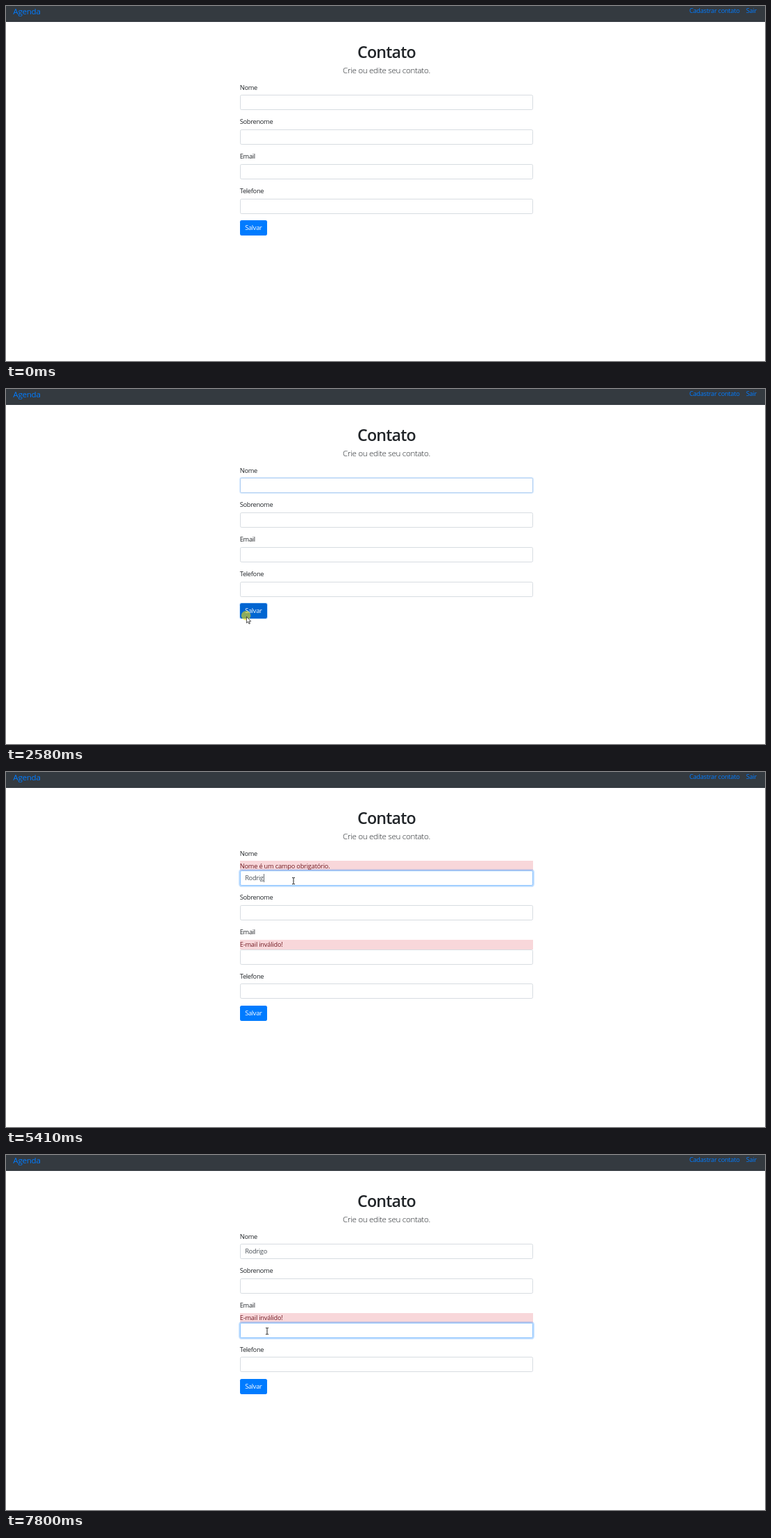
Recreate the animation shown at these times as an HTML page. Size 1093x512 px, loop 8000 ms.

```html
<!DOCTYPE html>
<html lang="pt-BR">
<head>
<meta charset="utf-8">
<title>Agenda</title>
<style>
* { box-sizing: border-box; margin: 0; }
html { font-size: 9.26px; }
html, body { width: 100%; height: 100%; overflow: hidden; background: #fff; }
body {
  position: relative; color: #212529; white-space: nowrap;
  font: 1rem/1.5 "Open Sans", "Noto Sans", sans-serif; letter-spacing: -.03em;
}
nav { position: absolute; inset: 0 0 auto; height: 23px; background: #343a40; color: #007bff; }
nav span { position: absolute; top: .3px; }
nav .brand { left: 10.3px; top: -1.4px; font-size: 1.25rem; letter-spacing: -.02em; }
main { position: absolute; left: 336.7px; top: 51.4px; width: 422.6px; }
h1 {
  position: relative; top: 1.2px; font-size: 2.5rem; font-weight: 600; line-height: 27.8px;
  letter-spacing: -.032em; text-align: center;
}
.lead { height: 30.6px; padding-top: 4.4px; font-size: 1.25rem; font-weight: 300; letter-spacing: -.025em; text-align: center; }
.field { margin-bottom: 1rem; }
.label { height: 2rem; padding-top: .85px; }
.error { height: 1.5rem; padding-top: .5px; background: #f8d7da; color: #721c24; letter-spacing: -.022em; }
.box {
  display: flex; align-items: center; height: 2.375rem; padding-left: .7rem;
  border: 1px solid #d7dce1; border-radius: .25rem; background: #fff; color: #495057;
}
.caret { width: 1px; height: 1.35rem; background: #6a7076; }
.save {
  width: 4.25rem; height: 2.375rem; line-height: 2.375rem; text-align: center;
  border-radius: .25rem; background: #007bff; color: #fff;
}
svg { position: absolute; inset: 0; width: 100%; height: 100%; }
svg path { fill: #fff; stroke: #222; stroke-width: .8; stroke-linejoin: round; }
</style>
</head>
<body>
<nav>
  <span class="brand">Agenda</span>
  <span style="right:36.5px">Cadastrar contato</span>
  <span style="right:12px">Sair</span>
</nav>
<main>
  <h1>Contato</h1>
  <div class="lead">Crie ou edite seu contato.</div>
  <div id="fields"></div>
  <div class="save">Salvar</div>
</main>
<svg>
  <circle r="6.8" fill="rgb(255,230,0)" fill-opacity=".55"/>
  <g id="mouse">
    <path id="arrow" d="M.4 .4V9.4L2.5 7.5L4 10.8L5.4 10.2L4 7.1H6.7Z"/>
    <path id="hand" d="M-1 7V1Q0 -.4 1 1V5L4.5 5.6Q5.8 6 5.6 7.6L4.6 11V13.2H-.6V11.6L-3.6 8Q-3.6 6.4 -2.4 6.8L-1 8Z"/>
    <path id="beam" style="fill:none;stroke-width:1" d="M-2 -4.6H-.6L0 -4L.6 -4.6H2M0 -4V4M-2 4.6H-.6L0 4L.6 4.6H2"/>
  </g>
</svg>
<script>
const LOOP = 8000, STEP = 68, FADE = 150;
const $ = s => document.querySelector(s);
const clamp = v => Math.min(1, Math.max(0, v));
const within = (t, spans = []) => spans.some(([a, b]) => t >= a && t < b);
// Fades in and out at the ends of each time span
const fade = (t, spans = []) =>
  Math.max(0, ...spans.map(([a, b]) => Math.min(clamp((t - a) / FADE), clamp(1 - (t - b) / FADE))));

const NAME = 'Rodrigo', KEYS = [4620, 4820, 4950, 5150, 5280, 5410, 5610];

const fields = [
  { label: 'Nome', error: 'Nome é um campo obrigatório.', errorAt: [[2650, 6620]],
    focus: [[1470, 2510], [3760, 6480]], caret: [[1930, 2510], [3760, 4290], [4620, 6140]] },
  { label: 'Sobrenome' },
  { label: 'Email', error: 'E-mail inválido!', errorAt: [[2650, LOOP]],
    focus: [[7320, LOOP + FADE]], caret: [[7320, 7800]] },
  { label: 'Telefone' }
];
const saveFocus = [[2510, 3760], [6480, 7320]];
const hover = [[2100, 2510], [6410, 6480]];
const press = [[2510, 2650], [6480, 6620]];
const clicks = [[870, 1010], [3760, 3890], [7320, 7470], ...press];

// Start time, number of steps, points of the route
const moves = [
  [70, 9, [1034, 496], [700, 270], [438, 146], [463, 142]],
  [1470, 8, [463, 142], [350, 240], [259, 310], [300, 326], [346, 328]],
  [2650, 8, [346, 328], [260, 360], [200, 335], [260, 200], [449, 119]],
  [3340, 6, [449, 119], [414, 157]],
  [5870, 1, [414, 157], [419, 156]],
  [6070, 5, [419, 156], [385, 260], [347, 357]],
  [6690, 7, [347, 357], [352, 315], [376, 254]]
];

for (const f of fields) {
  const add = (cls, text, parent) => {
    const el = parent.appendChild(document.createElement('div'));
    el.className = cls;
    el.textContent = text;
    return el;
  };
  const row = add('field', '', $('#fields'));
  add('label', f.label, row);
  f.errorEl = add('error', f.error || '', row);
  f.box = add('box', '', row);
  f.text = add('text', '', f.box);
  f.caretEl = add('caret', '', f.box);
}
const save = $('.save');

function mouseAt(t) {
  const [start, steps, ...pts] = moves.findLast(m => m[0] <= t) || moves[0];
  const k = clamp((Math.floor((t - start) / STEP) + 1) / steps);
  const u = k * k * (3 - 2 * k) * (pts.length - 1);
  const i = Math.min(Math.floor(u), pts.length - 2);
  return pts[i].map((v, axis) => v + (pts[i + 1][axis] - v) * (u - i));
}

function hits(el, x, y) {
  const r = el.getBoundingClientRect();
  return x >= r.left && x <= r.right && y >= r.top && y <= r.bottom;
}

function ring(el, amount, alpha) {
  el.style.boxShadow = amount ? `0 0 0 ${.2 * amount}rem rgba(0,123,255,${alpha * amount})` : 'none';
}

function draw(t) {
  for (const f of fields) {
    const glow = fade(t, f.focus);
    f.errorEl.style.display = within(t, f.errorAt) ? '' : 'none';
    f.caretEl.style.display = within(t, f.caret) ? '' : 'none';
    f.box.style.borderColor = `color-mix(in srgb, #8cc3ff ${glow * 100}%, #d7dce1)`;
    ring(f.box, glow, .25);
  }
  fields[0].text.textContent = NAME.slice(0, KEYS.filter(k => k <= t).length);

  const pressed = within(t, press);
  save.style.background = pressed ? '#0065d1' : within(t, hover) ? '#0069d9' : '#007bff';
  ring(save, fade(t, saveFocus), .5);

  const [x, y] = mouseAt(t);
  const kind = fields.some(f => hits(f.box, x, y)) ? 'beam'
    : hits(save, x, y) && !pressed ? 'hand' : 'arrow';
  for (const id of ['arrow', 'hand', 'beam']) $('#' + id).style.display = id === kind ? '' : 'none';
  const mouse = $('#mouse'), spot = $('circle');
  mouse.style.display = t < moves[0][0] ? 'none' : '';
  mouse.setAttribute('transform', `translate(${x} ${y})`);
  spot.style.display = within(t, clicks) ? '' : 'none';
  spot.setAttribute('transform', `translate(${x - .4} ${y - 1.2})`);
}

const begin = performance.now();
function tick() {
  draw((performance.now() - begin) % LOOP);
  requestAnimationFrame(tick);
}
tick();
</script>
</body>
</html>
```
